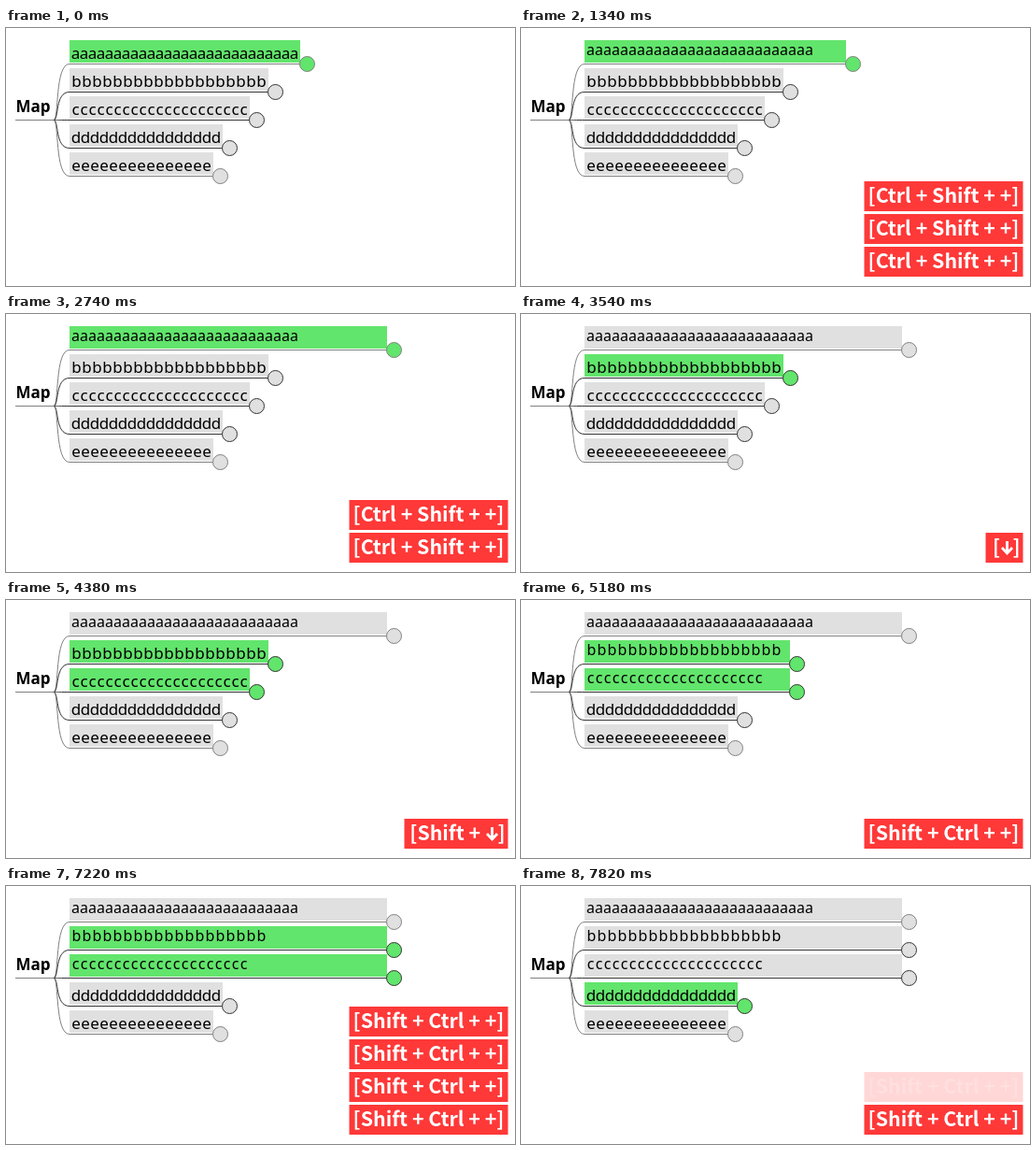
An HTML page with a canvas for the animation above (8000 ms loop, 545x276 px).

```html
<!DOCTYPE html>
<html lang="en">
<head>
<meta charset="utf-8">
<title>Mind map node width</title>
<style>
html, body { margin: 0; width: 100%; height: 100%; overflow: hidden; background: #fff; }
canvas { display: block; }
</style>
</head>
<body>
<canvas id="stage" width="545" height="276"></canvas>
<script>
const ctx = document.getElementById('stage').getContext('2d');
const LOOP = 8000;
const LEFT = 68;
const MAP_FONT = '"Noto Sans", "Open Sans", sans-serif';
const KEY_FONT = 'bold 21.33px "Noto Sans CJK JP", "Noto Sans CJK SC", "Noto Sans CJK", sans-serif';
const GREEN = '#62e56c', GREY = '#e0e0e0', RED = '#ff3838';

// steps: times at which the node widens by 20px, beginning at the width `first`
const wide = [5180, 5780, 5980, 6180, 6380, 6620, 6820];
const nodes = [
  { ch: 'a', n: 27, pitch: 9, line: '#808080', first: 260, steps: [500, 1140, 1540, 1940, 2540], sel: [0, 3140] },
  { ch: 'b', n: 19, pitch: 11, line: '#333', first: 220, steps: wide, sel: [3140, 7820] },
  { ch: 'c', n: 21, pitch: 9, line: '#333', first: 220, steps: wide, sel: [4180, 7820] },
  { ch: 'd', n: 16, pitch: 10, line: '#333', first: 0, steps: [], sel: [7820, LOOP] },
  { ch: 'e', n: 15, pitch: 10, line: '#808080', first: 0, steps: [], sel: [LOOP, LOOP] }
];

const GROW = '[Ctrl + Shift + +]', GROW2 = '[Shift + Ctrl + +]';
const DOWN = '[↓]', EXTEND = '[Shift + ↓]';
const badgeWidth = { [GROW]: 170, [GROW2]: 170, [DOWN]: 40, [EXTEND]: 111 };

// label, shown, hidden, faint for the last 200 ms
const badges = [
  [GROW, 500, 1740], [GROW, 940, 2340], [GROW, 1340, 2740, true],
  [GROW, 1740, 2940], [GROW, 2340, 3540],
  [DOWN, 3140, 4380], [EXTEND, 3980, 5180],
  [GROW2, 4980, 6380, true], [GROW2, 5780, 7020], [GROW2, 5980, 7220],
  [GROW2, 6180, 7420], [GROW2, 6380, 7620], [GROW2, 6620, 8020, true],
  [GROW2, 6820, 8060]
];

function drawNode(node, row, t) {
  const y = 38.5 + row * 30;
  const grown = node.steps.filter(s => s <= t).length;
  const width = grown ? node.first + 20 * (grown - 1) : node.n * node.pitch + 4;
  const right = LEFT + width;
  const fill = t >= node.sel[0] && t < node.sel[1] ? GREEN : GREY;

  ctx.fillStyle = fill;
  ctx.fillRect(LEFT, y - 25.5, width, 24);

  ctx.strokeStyle = node.line;
  ctx.lineWidth = 1;
  ctx.beginPath();
  ctx.moveTo(51, 98.5);
  ctx.bezierCurveTo(57, 98.5, 52, y, LEFT, y);
  ctx.lineTo(right, y);
  ctx.stroke();

  ctx.beginPath();
  ctx.arc(right + 7.5, y, 8, 0, Math.PI * 2);
  ctx.fillStyle = fill;
  ctx.fill();
  ctx.stroke();

  ctx.fillStyle = '#000';
  ctx.font = (grown ? 16 : 17) + 'px ' + MAP_FONT;
  ctx.textAlign = 'center';
  const base = y - (grown ? 9.5 : 5.5);
  for (let i = 0; i < node.n; i++) {
    ctx.fillText(node.ch, LEFT + 2 + (i + 0.5) * node.pitch, base);
  }
}

function drawArrow(x, y) {
  ctx.strokeStyle = '#fff';
  ctx.lineWidth = 2.8;
  ctx.beginPath();
  ctx.moveTo(x, y - 14);
  ctx.lineTo(x, y - 1);
  ctx.moveTo(x - 5.5, y - 7);
  ctx.lineTo(x, y - 1);
  ctx.lineTo(x + 5.5, y - 7);
  ctx.stroke();
}

function drawBadge([label, , off, faint], slot, t) {
  const w = badgeWidth[label], x = 537.5 - w, y = 234 - slot * 35;
  const base = y + 23;
  ctx.globalAlpha = faint && t >= off - 200 ? 0.2 : 1;
  ctx.fillStyle = RED;
  ctx.fillRect(x, y, w, 32);
  ctx.fillStyle = '#fff';
  ctx.font = KEY_FONT;
  const cut = label.indexOf('↓');
  if (cut < 0) {
    ctx.textAlign = 'center';
    ctx.fillText(label, x + w / 2, base);
  } else {
    ctx.textAlign = 'right';
    ctx.fillText(']', 534.5, base);
    ctx.fillText(label.slice(0, cut), 513, base);
    drawArrow(520.5, base);
  }
  ctx.globalAlpha = 1;
}

function draw(t) {
  ctx.fillStyle = '#fff';
  ctx.fillRect(0, 0, 545, 276);

  ctx.strokeStyle = '#808080';
  ctx.lineWidth = 1;
  ctx.beginPath();
  ctx.moveTo(10, 98.5);
  ctx.lineTo(51, 98.5);
  ctx.stroke();

  nodes.forEach((node, row) => drawNode(node, row, t));

  ctx.fillStyle = '#000';
  ctx.font = 'bold 17px ' + MAP_FONT;
  ctx.textAlign = 'left';
  ctx.fillText('Map', 10.5, 90);

  // the newest badge sits at the bottom
  badges.filter(b => t >= b[1] && t < b[2]).reverse()
    .forEach((b, slot) => drawBadge(b, slot, t));
}

const start = performance.now();
function tick() {
  draw((performance.now() - start) % LOOP);
  requestAnimationFrame(tick);
}
tick();
</script>
</body>
</html>
```
